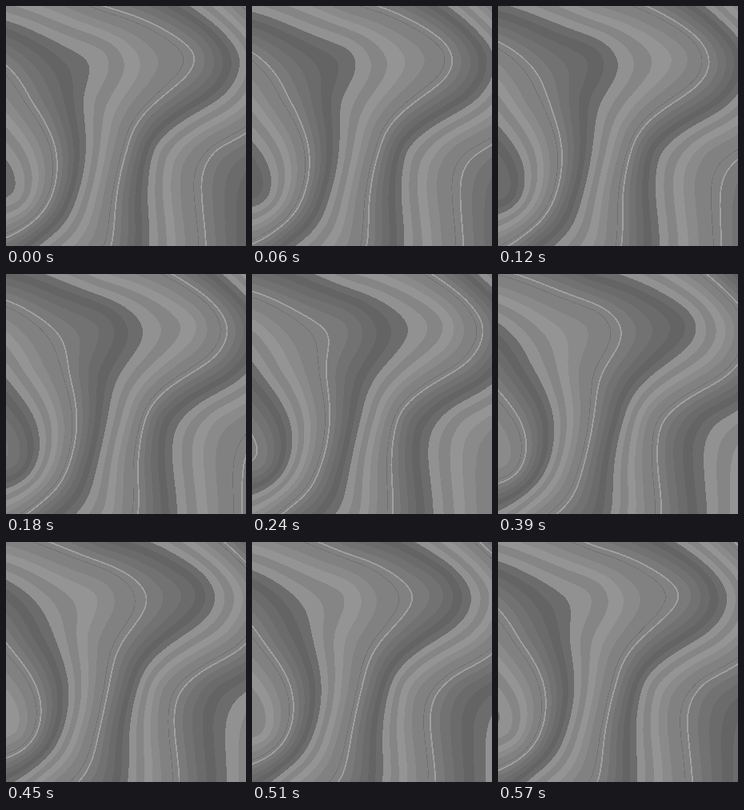
An HTML page with a canvas for the animation above (600 ms loop, 300 by 300 pixels).

```html
<!DOCTYPE html>
<html lang="en">
<head>
<meta charset="utf-8">
<title>Flowing grey bands</title>
<style>
html, body { margin: 0; width: 100%; height: 100%; overflow: hidden; background: #777; }
canvas { display: block; width: 100vw; height: 100vh; image-rendering: pixelated; }
</style>
</head>
<body>
<canvas id="stage" width="300" height="300"></canvas>
<script>
const SIZE = 300, LOOP = 600, STEP = 30, ROW = 60, UNIT = 100;

// Key points of a smooth height field: level, first y, then one x per row.
const contours = [
  [.5, 180, 4, 15],
  [1, 60, -22, 33, 62, 56, -28],
  [1.5, 0, -55, 118, 107, 106, 94, 50],
  [2, 0, 122, 234, 188, 151, 138, 131],
  [2.5, 0, 240, 298, 272, 192, 184, 187],
  [3, 0, 302],
  [3, 180, 264, 245, 250]
];
const points = contours.flatMap(([level, top, ...xs]) =>
  xs.map((x, i) => ({ x: x / UNIT, y: (top + i * ROW) / UNIT, level })));

// One cycle: dark steps, a hard jump, light steps.
const JUMP = .43;
const dark = [122, 114, 107, 100, 108];
const light = [145, 133, 148, 138, 129, 129];
const LINE = 160, HAIR = 110, HAIR_PHASE = .935;

// Thin-plate kernel of the squared distance.
const kernel = d => d ? d * Math.log(d) : 0;

function solve(m) {
  const n = m.length;
  for (let c = 0; c < n; c++) {
    let best = c;
    for (let r = c + 1; r < n; r++)
      if (Math.abs(m[r][c]) > Math.abs(m[best][c])) best = r;
    [m[c], m[best]] = [m[best], m[c]];
    for (let r = 0; r < n; r++) {
      if (r === c) continue;
      const f = m[r][c] / m[c][c];
      for (let k = c; k <= n; k++) m[r][k] -= f * m[c][k];
    }
  }
  return m.map((row, i) => row[n] / row[i]);
}

// Smoothest surface through all key points.
function fitSurface() {
  const n = points.length;
  const rows = points.map(a => [
    ...points.map(b => kernel((a.x - b.x) ** 2 + (a.y - b.y) ** 2)),
    1, a.x, a.y, a.level
  ]);
  for (const term of [() => 1, p => p.x, p => p.y])
    rows.push([...points.map(term), 0, 0, 0, 0]);
  const w = solve(rows);
  return (px, py) => {
    const x = px / UNIT, y = py / UNIT;
    let sum = w[n] + w[n + 1] * x + w[n + 2] * y;
    for (let k = 0; k < n; k++) {
      const dx = x - points[k].x, dy = y - points[k].y;
      sum += w[k] * kernel(dx * dx + dy * dy);
    }
    return sum;
  };
}

const height = fitSurface();
const field = new Float32Array(SIZE * SIZE);
const slope = new Float32Array(SIZE * SIZE);
for (let i = 0; i < field.length; i++) {
  const x = i % SIZE + .5, y = Math.floor(i / SIZE) + .5;
  const h = field[i] = height(x, y);
  slope[i] = Math.hypot(height(x + 1, y) - h, height(x, y + 1) - h);
}

const pick = (list, k) => list[Math.floor(k * list.length)];

// The slope turns a distance in phase into pixels, so lines keep their width.
function grey(phase, perPixel) {
  if (Math.min(phase, 1 - phase) < perPixel * .9) return LINE;
  if (Math.abs(phase - HAIR_PHASE) < perPixel * .4) return HAIR;
  return phase < JUMP ? pick(dark, phase / JUMP) : pick(light, (phase - JUMP) / (1 - JUMP));
}

const ctx = document.getElementById("stage").getContext("2d");
const image = ctx.createImageData(SIZE, SIZE);
const pixels = new Uint32Array(image.data.buffer);

function draw() {
  const shift = Math.floor(performance.now() % LOOP / STEP) * STEP / LOOP;
  for (let i = 0; i < pixels.length; i++) {
    const h = field[i] - shift;
    pixels[i] = 0xff000000 | grey(h - Math.floor(h), slope[i]) * 0x10101;
  }
  ctx.putImageData(image, 0, 0);
  requestAnimationFrame(draw);
}
draw();
</script>
</body>
</html>
```
